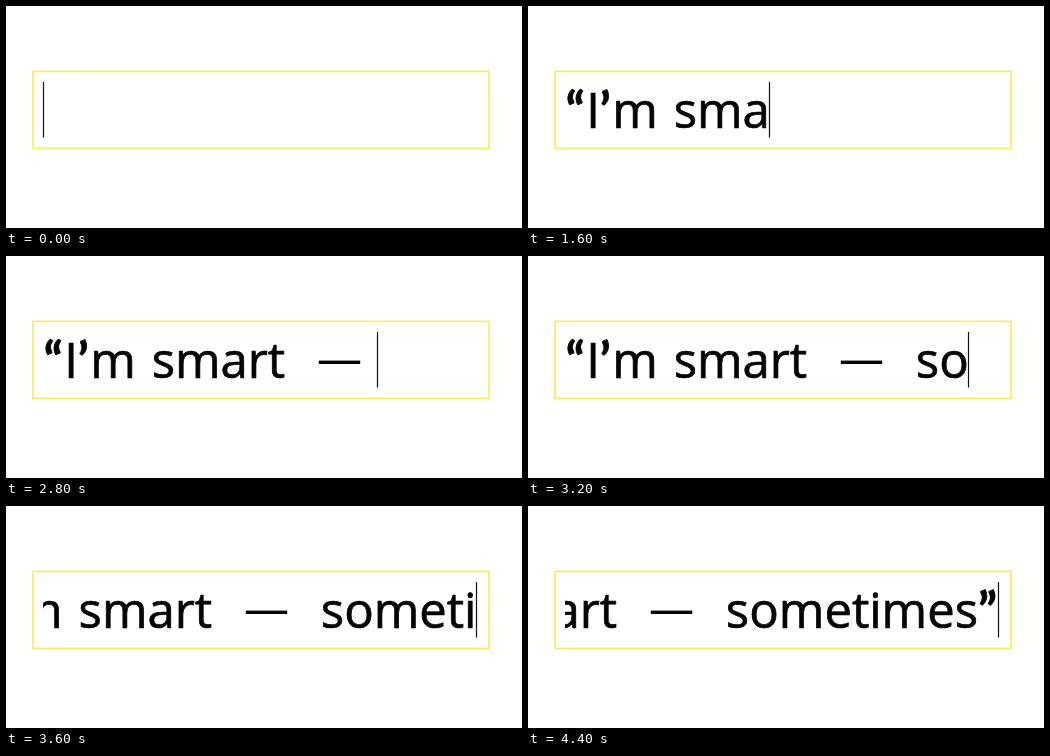
These frames come from a looping animation (516 by 222 pixels, 4800 ms). An HTML page:

```html
<!DOCTYPE html>
<html lang="en">
<head>
<meta charset="utf-8">
<title>Typing in a text field</title>
<style>
  html, body { margin: 0; width: 100%; height: 100%; overflow: hidden; background: #fffffd; }
  svg { display: block; width: 516px; height: 222px; }
  text {
    font: 49px "Open Sans", "Noto Sans", sans-serif;
    font-kerning: none;
    word-spacing: 3.2px;
    white-space: pre;
    fill: #050505;
    stroke: #050505;
    stroke-width: 0.7px;
  }
  .quote { font-family: Lato, "Open Sans", sans-serif; font-weight: 700; letter-spacing: 1.5px; }
  .dash { font-size: 45px; stroke: none; }
</style>
</head>
<body>
<svg viewBox="0 0 516 222">
  <defs><clipPath id="typed"><rect id="window" x="37" y="70" width="0" height="68"/></clipPath></defs>
  <rect x="27" y="65.4" width="456" height="77" fill="none" stroke="#f7ec68" stroke-width="1.7"/>
  <g clip-path="url(#typed)">
    <text id="line" y="122.3" xml:space="preserve"><tspan class="quote">“</tspan>I<tspan class="quote">’</tspan>m smart  <tspan class="dash" dy="-3">—</tspan><tspan dy="3">  sometimes</tspan><tspan class="quote">”</tspan></text>
  </g>
  <line id="caret" y1="76" y2="131.5" stroke="#111" stroke-width="1.2"/>
</svg>
<script>
const LOOP = 4800, BEAT = 200, LEFT = 37.7, RIGHT = 470.5;

// Characters typed on each beat; an empty beat is a pause.
const BEATS = "||“||I|’m| |s|ma|r|t|| || — | |so|me|ti|mes||”".split("|");

const line = document.getElementById("line");
const caret = document.getElementById("caret");
const clip = document.getElementById("window");

function penAfter(count) {
  return count ? LEFT + line.getEndPositionOfChar(count - 1).x - line.getStartPositionOfChar(0).x : LEFT;
}

function draw(time) {
  const typed = BEATS.slice(0, Math.floor(time / BEAT) + 1).join("").length;
  const pen = penAfter(typed);
  const scroll = Math.max(0, pen - RIGHT);
  const x = Math.floor(pen - scroll) + 0.5;
  line.setAttribute("x", LEFT - scroll);
  clip.setAttribute("width", x - 37);
  caret.setAttribute("x1", x);
  caret.setAttribute("x2", x);
}

const begin = performance.now();
function tick() {
  draw((performance.now() - begin) % LOOP);
  requestAnimationFrame(tick);
}
tick();
</script>
</body>
</html>
```
